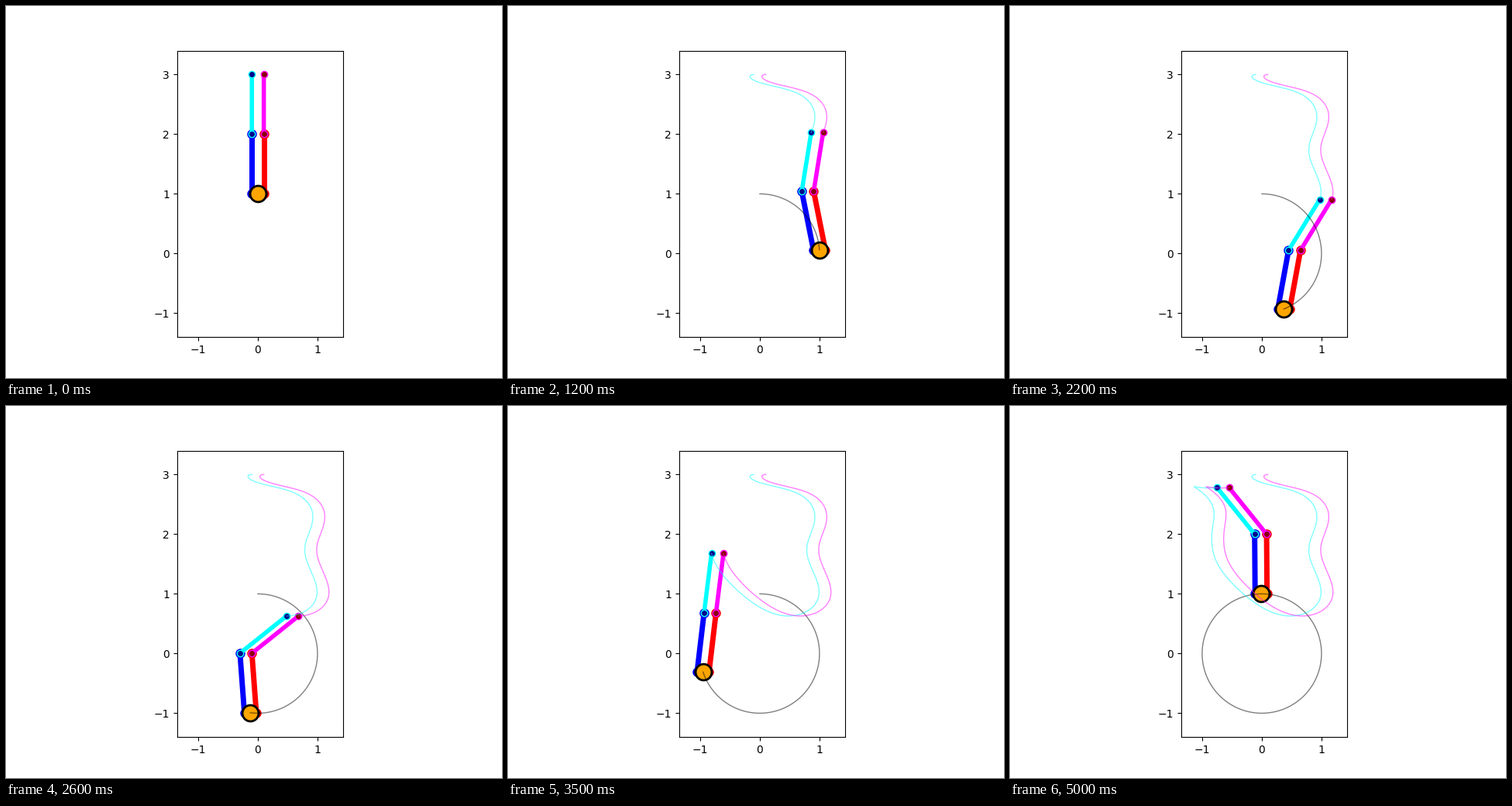
These frames come from a looping animation (640 px wide and 480 px high, 5.05 s). A matplotlib script:

```python
import numpy as np
import matplotlib.pyplot as plt
from matplotlib.animation import FuncAnimation

FRAMES, SUB = 101, 5
STEPS = (FRAMES - 1) * SUB
theta = 2 * np.pi * np.arange(STEPS) / STEPS


def bump(x, centre, width):
    return np.exp(-((x - centre) / width) ** 2)


def direction(angle):
    return np.column_stack([np.sin(angle), np.cos(angle)])


# the upper link kicks back at the start, then sways in smooth swings
lean = (-3 * theta * np.exp(-theta / 0.36)
        + 0.305 * bump(theta, 1.23, 0.5)
        + 0.9 * bump(theta, 3.305, 0.775)
        + 0.175 * bump(theta, 5.21, 0.38)
        - 0.68 * bump(theta, 6.24, 0.6))

base = direction(theta)
lower = direction(0.2 * np.sin(3 * theta))
upper = direction(lean)

fig, ax = plt.subplots(figsize=(6.4, 4.8), dpi=100)
ax.set_aspect("equal")
ax.set_xlim(-1.352, 1.432)
ax.set_ylim(-1.4, 3.4001)
ax.set_xticks(range(-1, 2))
ax.set_yticks(range(-1, 4))


def link(color, fill, width, size):
    return ax.plot([], [], "o-", color=color, mfc=fill, lw=width, ms=size)[0]


def trail(color):
    return ax.plot([], [], color=color, lw=1, alpha=0.5)[0]


links, tips = [], []
for shift, low, high, fill in [(-0.1, "blue", "cyan", "darkblue"),
                               (0.1, "red", "magenta", "darkred")]:
    hip = base + [shift, 0]
    knee = hip + lower
    tip = knee + upper
    links.append((link(low, fill, 5, 8), hip, knee))
    links.append((link(high, fill, 4, 6), knee, tip))
    tips.append((high, tip))

body, = ax.plot([], [], "o", color="orange", ms=15, mec="black", mew=2)
trails = [(trail(color), path) for color, path in [("black", base)] + tips]


def update(i):
    n = min(i * SUB, STEPS - 1)
    for line, start, end in links:
        line.set_data(*zip(start[n], end[n]))
    body.set_data(*base[n:n + 1].T)
    for line, path in trails:
        line.set_data(*path[:n + 1].T)
    return [line for line, *_ in links + trails] + [body]


anim = FuncAnimation(fig, update, frames=FRAMES, interval=50,
                     repeat=True, repeat_delay=0)
plt.show()
```
